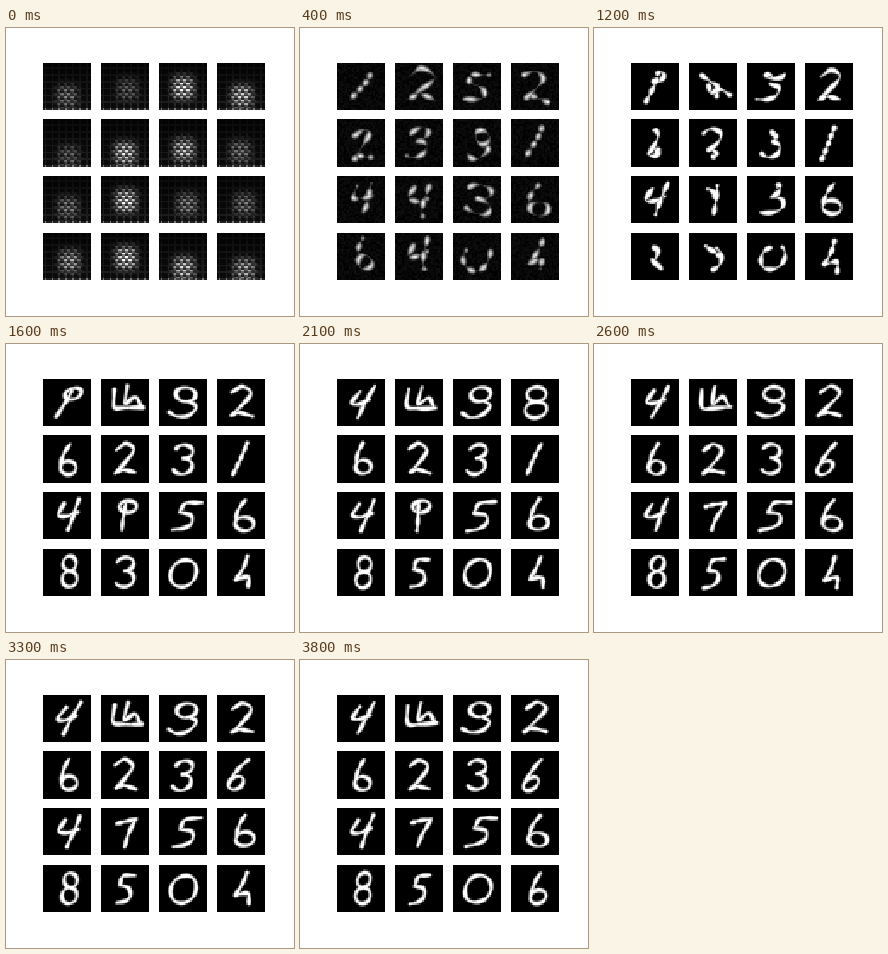
These frames come from a looping animation (288 px wide and 288 px high, 3.9 s). A matplotlib script:

```python
import numpy as np
import matplotlib.pyplot as plt
from matplotlib.animation import FuncAnimation

N, STEPS, SAMPLES = 28, 39, 40
TOP, HEIGHT = 5, 18
KEYS = (8, 16, 21, 26, 33, 38)
X, Y = np.meshgrid(np.arange(N) + 0.5, np.arange(N) + 0.5)
COL, ROW = X.astype(int), Y.astype(int)


def arc(cx, cy, rx, ry, start, end):
    """Part of an ellipse; angles in degrees, clockwise from the right."""
    a = np.radians(np.linspace(start, end, SAMPLES))
    return np.column_stack([cx + rx * np.cos(a), cy + ry * np.sin(a)])


def curve(*points):
    """Catmull-Rom curve through a few points."""
    p = np.array(points, float)
    p = np.vstack([2 * p[0] - p[1], p, 2 * p[-1] - p[-2]])
    u = np.linspace(0, len(p) - 3 - 1e-6, SAMPLES)
    i = u.astype(int)
    t = (u - i)[:, None]
    a, b, c, d = p[i], p[i + 1], p[i + 2], p[i + 3]
    return b + 0.5 * t * (c - a + t * (2 * a - 5 * b + 4 * c - d
                                       + t * (3 * (b - c) + d - a)))


# Each glyph is two strokes in a unit box.
GLYPHS = {
    "0": (arc(.5, .54, .5, .44, -60, 120), arc(.5, .54, .5, .44, 120, 300)),
    "U": (arc(.5, .5, .5, .45, -30, 90), arc(.5, .5, .5, .45, 90, 200)),
    "1": (curve((.5, 0), (.5, .5)), curve((.5, .5), (.5, 1))),
    "2": (curve((.05, .2), (.5, 0), (.9, .2), (.6, .55), (.05, .95)),
          curve((.05, .95), (.4, .85), (1, .95))),
    "3": (arc(.45, .25, .45, .22, 200, 450), arc(.45, .73, .5, .26, -90, 150)),
    "4": (curve((.1, .15), (0, .5), (.45, .56), (.95, .42)),
          curve((.8, 0), (.8, 1))),
    "5": (curve((1, .08), (.4, .12), (.2, .42)),
          curve((.2, .42), (.65, .5), (.72, .75), (.45, .93), (0, 1))),
    "6": (curve((.55, 0), (.2, .35), (.05, .77)),
          arc(.5, .77, .45, .22, 180, -180)),
    "7": (curve((0, .25), (.3, .2), (1, .12)),
          curve((1, .12), (.65, .6), (.5, 1))),
    "8": (arc(.5, .24, .42, .24, 90, 450), arc(.5, .74, .48, .26, -90, 270)),
    "9": (arc(.6, .25, .36, .23, -20, 340),
          curve((.75, .47), (.98, .65), (.7, .93), (.3, .98), (0, .85))),
    "P": (arc(.55, .22, .45, .19, 180, 540), curve((.4, .15), (.4, 1))),
    "h": (curve((.55, 0), (.4, .35), (.05, .75)),
          curve((.05, .75), (.75, .68), (.85, 1))),
    "w": (curve((.05, .1), (.02, .65), (.4, .7), (1, .68)),
          curve((.5, 0), (.4, .55), (.75, .35), (.95, .66))),
}

# Glyph at each key step, left, right, slant, height and glow of first blob.
TILES = (
    ("1P4444", 9, 19, 10, 20, .45), ("2wwwww", 7, 24, 0, 16, .35),
    ("599999", 6, 22, 1, 15, .95), ("228222", 8, 21, 1, 20, .8),
    ("266666", 10, 20, 0, 22, .35), ("322222", 8, 20, 0, 20, .85),
    ("933333", 9, 20, 2, 18, .8), ("111666", 9, 18, 8, 19, .45),
    ("444444", 9, 20, 7, 19, .45), ("4PP777", 9, 20, 2, 15, .95),
    ("355555", 9, 24, 2, 17, .5), ("666666", 10, 22, 0, 17, .45),
    ("688888", 11, 20, 1, 17, .65), ("435555", 9, 20, 0, 15, .95),
    ("U00000", 7, 22, 3, 21, .8), ("hhhhh6", 11, 21, 2, 22, .65),
)


def place(name, left, right, slant):
    x, y = np.vstack(GLYPHS[name]).T
    return np.column_stack([left + x * (right - left) + slant * (0.5 - y),
                            TOP + HEIGHT * y])


def strokes(tile, step, phase):
    """Glyph morphing to the next one, with a slow bend that calms down."""
    names, left, right, slant = tile[:4]
    u = np.interp(step, KEYS, range(len(KEYS)))
    k = min(int(u), len(KEYS) - 2)
    a, b = (place(names[i], left, right, slant) for i in (k, k + 1))
    p = a + (u - k) * (b - a)
    bend = 0.35 + 2 * max(0, 1 - step / 8)
    return p + bend * np.sin(p[:, ::-1] / 5 + phase + 0.5 * step)


def lattice(x, y, glow):
    """Dim grid of dots with a brighter zigzag patch."""
    blob = np.exp(-(np.abs(X - x) / 6.5) ** 3 - (np.abs(Y - y) / 7) ** 3)
    zigzag = np.where((COL + 2 * (ROW // 2)) % 4 < 2, 1, 0.35)
    zigzag = zigzag * np.where(ROW % 2, 0.45, 1)
    dots = np.where((COL % 4 == 1) | (ROW % 4 == 3), 0.09, 0.03)
    edge = 0.35 * ((ROW == N - 1) & (COL % 4 == 1))
    return glow * blob * zigzag + dots * (0.4 + Y / N) + edge


def picture(n, step):
    tile = TILES[n]
    start = lattice((tile[1] + tile[2]) / 2, *tile[4:])
    if step == 0:
        return start
    phase = np.random.default_rng(n).uniform(0, 2 * np.pi, 2)
    young = max(0, 1 - step / 8)
    p = strokes(tile, step, phase)

    # Pen width swells and thins along the stroke, breaking up early on.
    rough = np.interp(step, (1, 8, 16), (1.2, 1, 0.3))
    along = np.linspace(0, 4 * np.pi, len(p))
    width = 1.75 + rough * (np.sin(2 * along + phase[0] + step / 3) - 0.3) * 0.8
    gap = np.hypot(X[..., None] - p[:, 0], Y[..., None] - p[:, 1])
    ink = np.clip((width - gap).max(-1) / (1.2 + 2 * young), 0, 1)
    ink *= min(1, 0.5 + 0.1 * step)

    haze = np.random.default_rng(100 * step + n).random((N, N)) * 0.12 * young
    return np.clip(ink + haze + 0.7 * max(0, 1 - step / 3) * start, 0, 1)


fig, axes = plt.subplots(4, 4, figsize=(4, 4), dpi=72)
fig.subplots_adjust(left=0.125, bottom=0.125, right=0.9, top=0.88,
                    wspace=0.2, hspace=0.2)
images = []
for ax in axes.flat:
    ax.axis("off")
    images.append(ax.imshow(np.zeros((N, N)), cmap="gray", vmin=0, vmax=1,
                            interpolation="nearest"))


def draw(step):
    for n, image in enumerate(images):
        image.set_data(picture(n, step))
    return images


anim = FuncAnimation(fig, draw, frames=STEPS, interval=100, repeat=True,
                     repeat_delay=0)
plt.show()
```
